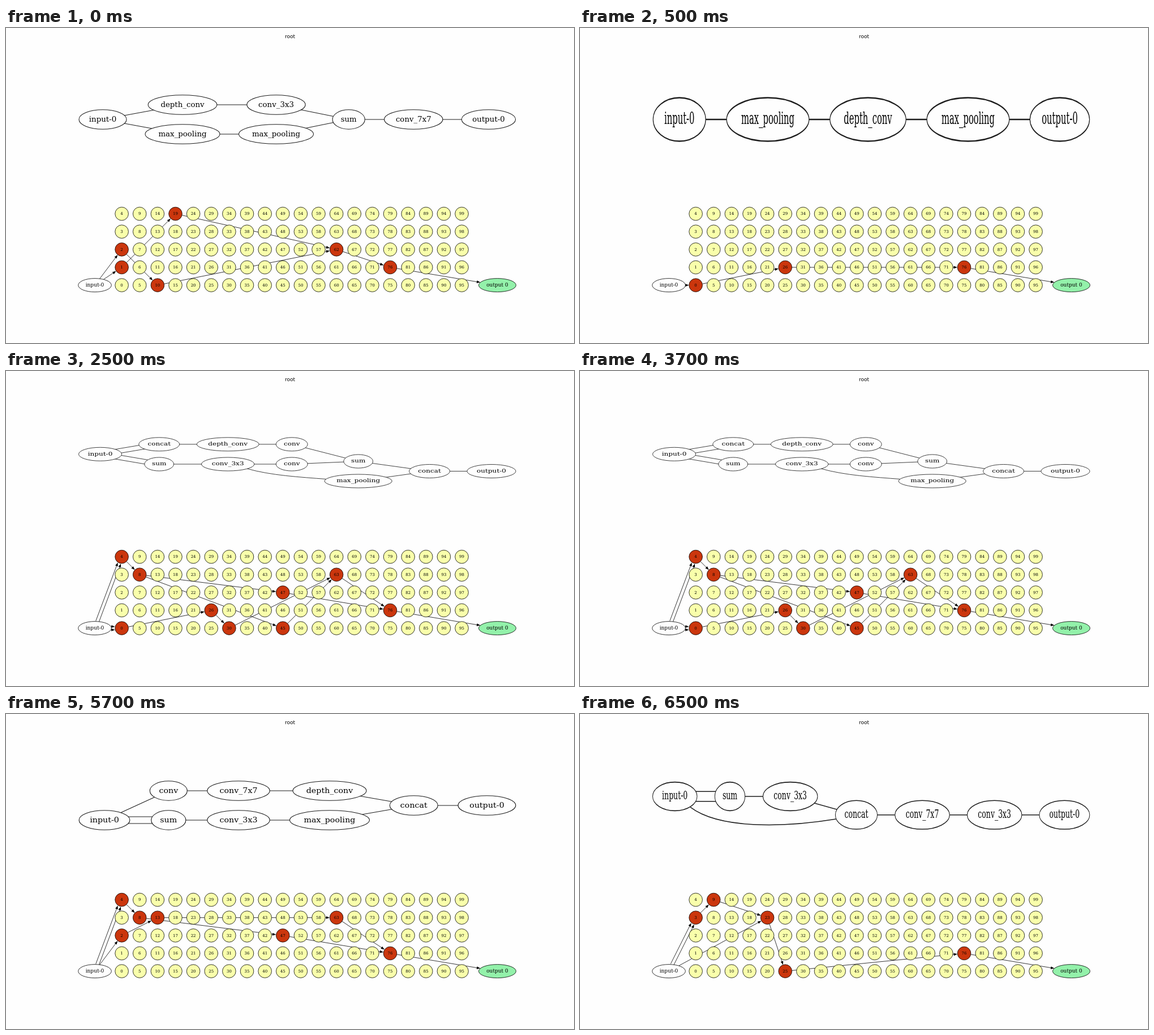
Write an HTML page with a canvas that moves like this. It is 1004 px wide and 558 px high and loops after 8 s.

```html
<!DOCTYPE html>
<html>
<head>
<meta charset="utf-8">
<style>
html, body { margin: 0; width: 100%; height: 100%; overflow: hidden; background: #fefefe; }
canvas { display: block; }
</style>
</head>
<body>
<canvas id="stage" width="1004" height="558"></canvas>
<script>
const ctx = document.getElementById('stage').getContext('2d');
const SERIF = '"DejaVu Serif", "Noto Serif", serif';
const SANS = '"DejaVu Sans", sans-serif';
const PAPER = '#fefefe', YELLOW = '#f9ffab', RED = '#cb360d', GREEN = '#93f1aa';
const LOOP = 8000;

// Ellipse half widths in layout units, before a graph is scaled
const HALF = {
  'input-0': 44.1, 'output-0': 50, depth_conv: 63.8, max_pooling: 69.2,
  conv_3x3: 54.2, conv_7x7: 54.2, conv: 32.4, sum: 30, concat: 41.7
};

// nodes: label x y; links: node pairs, "=" is a double link; paths: steps through the grid
const scenes = [
  {
    start: 0, sx: 0.953, sy: 0.955,
    nodes: 'input-0 171 162,depth_conv 312 136,max_pooling 312 188,conv_3x3 477.5 136,' +
      'max_pooling 477.5 188,sum 605.7 162,conv_7x7 720.3 162,output-0 853 162',
    links: '0-1 0-2 1-3 2-4 3-5 4-5 5-6 6-7',
    paths: 'in-2-10-62-76-out in-1-19-62'
  },
  {
    start: 500, sx: 1.053, sy: 2.14,
    nodes: 'input-0 175.7 162,max_pooling 332 162,depth_conv 509 162,max_pooling 686 162,output-0 848 162',
    links: '0-1 1-2 2-3 3-4',
    paths: 'in-0-26-76-out'
  },
  {
    start: 2500, sx: 0.862, sy: 0.667,
    nodes: 'input-0 166.5 147.3,concat 270.7 129.8,sum 270.7 165,depth_conv 392.2 129.8,conv_3x3 392.2 165,' +
      'conv 505.2 129.8,conv 505.2 165,sum 622.7 160,max_pooling 622.7 195,concat 748.6 177.5,output-0 858 177.5',
    links: '0=1 0=2 1-3 2-4 3-5 4-6 5-7 6-7 7-9 8-9 9-10',
    curve: [426, 173, 468, 185, 520, 188, 566, 191.5],
    paths: 'in=4-8-47-76-out 8-45-63-76 in=0-26-30-63'
  },
  {
    start: 4500, sx: 1.018, sy: 0.955,
    nodes: 'input-0 174 188,conv 287.3 136,sum 287.3 188,conv_7x7 411 136,conv_3x3 411 188,' +
      'depth_conv 572 136,max_pooling 572 188,concat 720.8 162,output-0 850 162',
    links: '0-1 0=2 1-3 2-4 3-5 4-6 5-7 6-7 7-8',
    paths: 'in=4-8-47-76-out in-2-13-63-76'
  },
  {
    start: 6500, sx: 0.89, sy: 1.41,
    nodes: 'input-0 167.7 146,sum 265 146,conv_3x3 371.7 146,concat 488.5 178.7,' +
      'conv_7x7 605 178.7,conv_3x3 732.7 178.7,output-0 856.4 178.7',
    links: '0=1 1-2 2-3 3-4 4-5 5-6',
    curve: [195, 165, 245, 203, 355, 202, 453, 186],
    paths: 'in=3-9-23-25-76-out in-23'
  }
];

function ellipse(x, y, rx, ry, fill) {
  ctx.beginPath();
  ctx.ellipse(x, y, rx, ry, 0, 0, Math.PI * 2);
  ctx.fillStyle = fill;
  ctx.fill();
  ctx.stroke();
}

function label(text, x, y, size, family) {
  ctx.font = size + 'px ' + family;
  ctx.textAlign = 'center';
  ctx.fillStyle = '#000';
  ctx.fillText(text, x, y);
}

function drawGraph({ nodes, links, curve, sx, sy }) {
  const list = nodes.split(',').map(s => {
    const [name, x, y] = s.split(' ');
    return { name, x: +x, y: +y };
  });
  ctx.strokeStyle = '#1c1c1c';
  ctx.beginPath();
  for (const link of links.split(' ')) {
    const [a, b] = link.split(/[-=]/).map(i => list[i]);
    const gaps = link.includes('=') ? [-6.2 * sy, 6.2 * sy] : [0];
    for (const gap of gaps) {
      ctx.moveTo(a.x, a.y + gap);
      ctx.lineTo(b.x, b.y + gap);
    }
  }
  if (curve) {
    ctx.moveTo(curve[0], curve[1]);
    ctx.bezierCurveTo(...curve.slice(2));
  }
  ctx.save();
  ctx.scale(sx, sy);
  ctx.lineWidth = 1.1;
  ctx.stroke();
  ctx.restore();

  for (const { name, x, y } of list) {
    ctx.save();
    ctx.translate(x, y);
    ctx.scale(sx, sy);
    ctx.lineWidth = 1.1;
    ellipse(0, 0, HALF[name], 18, PAPER);
    label(name, 0, 3.7, 14, SERIF);
    ctx.restore();
  }
}

function spot(id) {
  if (id === 'in') return { x: 157, y: 455.6, rx: 29.3, ry: 12 };
  if (id === 'out') return { x: 868.5, y: 455.6, rx: 33, ry: 12 };
  return { x: 204.6 + Math.floor(id / 5) * 31.63, y: 455.6 - (id % 5) * 31.63, rx: 12, ry: 12 };
}

function arrow(a, b, shift) {
  const dx = b.x - a.x, dy = b.y - a.y, len = Math.hypot(dx, dy);
  const ux = dx / len, uy = dy / len;
  const rim = n => 1 / Math.hypot(ux / n.rx, uy / n.ry);
  const at = (d, side) => [a.x + ux * d - uy * side, a.y + uy * d + ux * side];
  const tip = len - rim(b);
  const tail = Math.min(rim(a), tip - 6);
  ctx.beginPath();
  ctx.moveTo(...at(tail, shift));
  ctx.lineTo(...at(tip - 5, shift));
  ctx.stroke();
  ctx.beginPath();
  ctx.moveTo(...at(tip, shift));
  ctx.lineTo(...at(tip - 6.4, shift + 2.4));
  ctx.lineTo(...at(tip - 6.4, shift - 2.4));
  ctx.fill();
}

function drawGrid(paths) {
  const used = new Set(paths.match(/\d+/g).map(Number));
  ctx.strokeStyle = ctx.fillStyle = '#000';
  ctx.lineWidth = 0.8;
  for (const path of paths.split(' ')) {
    const steps = path.split(/([-=])/);
    for (let i = 0; i + 2 < steps.length; i += 2) {
      const shifts = steps[i + 1] === '=' ? [-2.9, 2.9] : [0];
      for (const s of shifts) arrow(spot(steps[i]), spot(steps[i + 2]), s);
    }
  }
  for (let id = 0; id < 100; id++) {
    const { x, y } = spot(id);
    ellipse(x, y, 11.8, 11.8, used.has(id) ? RED : YELLOW);
    label(id, x, y + 2.3, 7, SERIF);
  }
  for (const [id, text, fill] of [['in', 'input-0', PAPER], ['out', 'output 0', GREEN]]) {
    const { x, y, rx, ry } = spot(id);
    ellipse(x, y, rx, ry, fill);
    label(text, x, y + 2.4, 9, SERIF);
  }
}

let shown;
function frame(now) {
  const t = now % LOOP;
  const scene = scenes.filter(s => s.start <= t).pop();
  if (scene !== shown) {
    shown = scene;
    ctx.fillStyle = PAPER;
    ctx.fillRect(0, 0, 1004, 558);
    label('root', 502, 18.3, 9, SANS);
    drawGraph(scene);
    drawGrid(scene.paths);
  }
  requestAnimationFrame(frame);
}
const begin = performance.now();
(function tick() {
  frame(0);
})();
const base = frame;
frame = now => base(Math.max(0, now - begin));
</script>
</body>
</html>
```
